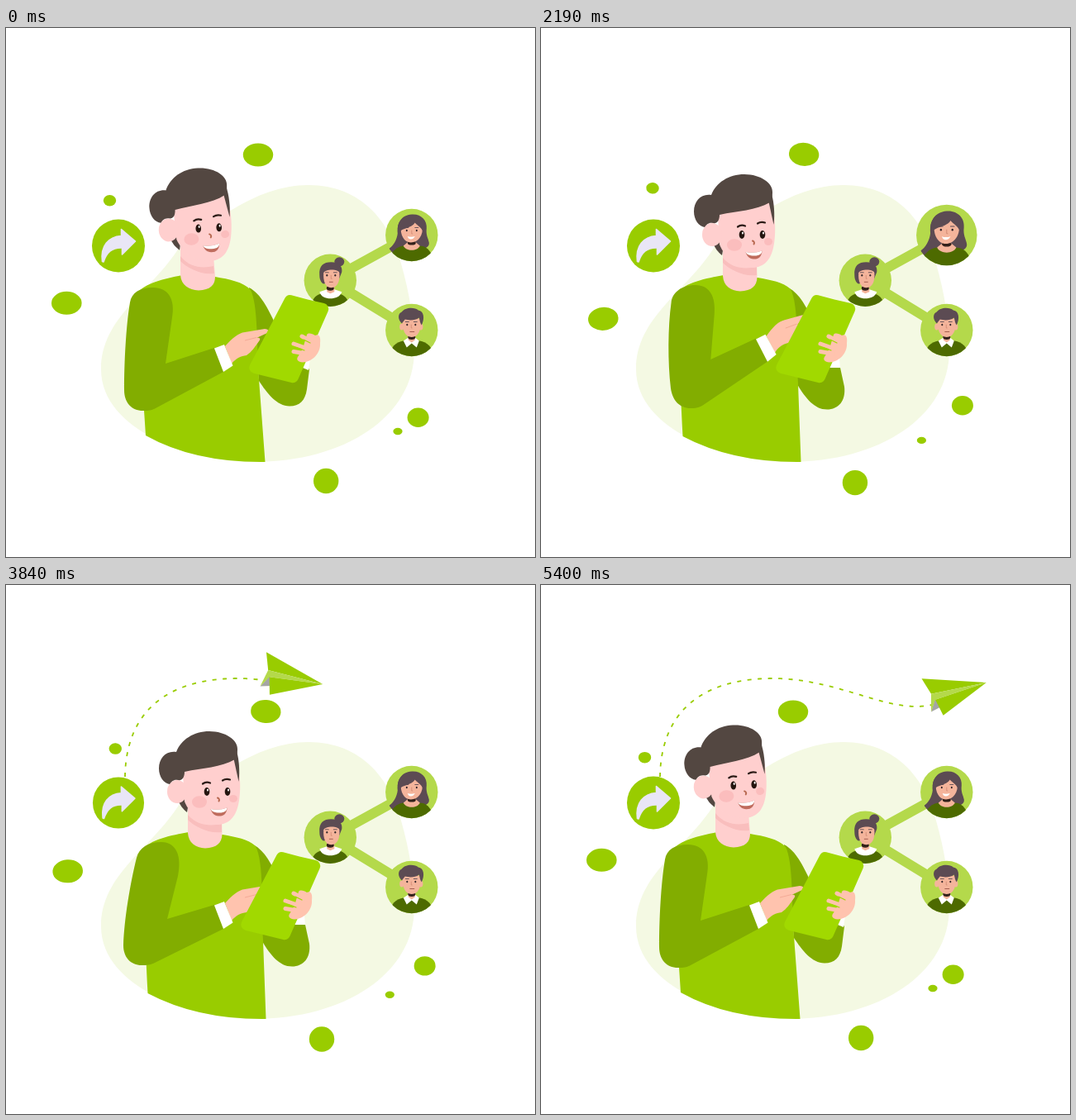
Animation, 640 px wide and 640 px high, one loop 5460 ms. Source, as an HTML page with a canvas:

```html
<!DOCTYPE html>
<html lang="en">
<head>
<meta charset="utf-8">
<title>Sharing</title>
<style>
html, body { margin: 0; width: 100%; height: 100%; overflow: hidden; background: #fff; }
canvas { display: block; width: 640px; height: 640px; }
</style>
</head>
<body>
<canvas id="stage" width="640" height="640"></canvas>
<script>
const ctx = document.getElementById('stage').getContext('2d');
const LOOP = 5460, STEP = 30;
const GREEN = '#99cc00', SLEEVE = '#82ad00', LIME = '#b4d94b', MOSS = '#4d6a00';
const HAIR = '#534741', FACE = '#ffcfce', HAND = '#ffc3ae';
const AV_HAIR = '#5c4b53', AV_SKIN = '#f4b49b';

const clamp = v => Math.max(0, Math.min(1, v));
const lerp = (a, b, k) => a + (b - a) * k;
const smooth = v => (1 - Math.cos(Math.PI * clamp(v))) / 2;

function fill(path, color) {
  ctx.fillStyle = color;
  ctx.fill(new Path2D(path));
}
function line(path, color, width) {
  ctx.strokeStyle = color;
  ctx.lineWidth = width;
  ctx.stroke(new Path2D(path));
}
function oval(x, y, rx, ry, color, turn = 0) {
  ctx.beginPath();
  ctx.ellipse(x, y, rx, ry, turn, 0, 7);
  ctx.fillStyle = color;
  ctx.fill();
}
function at(x, y, scale, turn, draw) {
  ctx.save();
  ctx.translate(x, y);
  ctx.rotate(turn);
  ctx.scale(scale, scale);
  draw();
  ctx.restore();
}
// Blend two path strings that share the same commands.
function morph(a, b, k) {
  const num = /-?\d+(\.\d+)?/g, to = b.match(num);
  let i = 0;
  return a.replace(num, v => lerp(+v, +to[i++], k).toFixed(2));
}

// ---------- timing ----------
function leanAt(t) {
  return t < 2000 ? smooth(t / 620) : 1 - smooth((t - 3990) / 750);
}
function reachAt(t) {
  if (t < 750) return smooth(t / 660);
  return Math.pow(1 - clamp((t - 750) / 3090), 1.35);
}
function pulse(t, start) {
  const u = t - start;
  if (u < 360) return lerp(1, 1.175, smooth(u / 360));
  if (u < 690) return lerp(1.175, 0.97, smooth((u - 360) / 330));
  return lerp(0.97, 1, smooth((u - 690) / 180));
}

// ---------- scenery ----------
const BLOB = 'M115 413C115 350 175 320 210 265C245 240 300 190 366 190C430 190 465 235 478 285' +
  'C488 320 494 355 494 390C494 470 410 525 300 525C232 526 115 489 115 413Z';

// x, y, rx, ry, drift x, drift y, turn
const DOTS = [
  [305, 153.5, 18.2, 14, 14.5, -0.7, 0.1],
  [73.3, 332.8, 18.3, 14, 2.2, 21, -0.1],
  [125.5, 208.7, 7.7, 6.8, 10.5, -16.5, 0.1],
  [498.6, 471.2, 13, 11.7, 12.5, -16, 0],
  [474, 488, 5.6, 4.2, -15, 12, 0],
  [387.2, 548, 15.2, 15.2, -8, 2.3, 0]
];
function dots(t) {
  const k = (1 - Math.cos(2 * Math.PI * t / LOOP)) / 2;
  for (const [x, y, rx, ry, dx, dy, turn] of DOTS)
    oval(x + dx * k, y + dy * k, rx, ry, GREEN, turn * k);
}

// ---------- avatars ----------
function eyes(x, y, gap) {
  oval(x - gap, y, 1, 1.2, '#33262a');
  oval(x + gap, y, 1, 1.2, '#33262a');
  ctx.lineCap = 'round';
  line(`M${x - gap - 2} ${y - 3.5}h4M${x + gap - 2} ${y - 3.5}h4`, AV_HAIR, 0.9);
  line(`M${x} ${y}v4h1`, '#cf8871', 0.8);
}
function bunGuy() {
  oval(11, -22.5, 6, 5.5, AV_HAIR);
  fill('M-13 -6C-14 -18 -8 -22 1 -22C11 -22 15 -17 14 -10L10 0L-7 4C-10 5 -13 0 -13 -6Z', AV_HAIR);
  fill('M-24 34C-22 20 -16 15 0 15C16 15 21 20 25 34Z', MOSS);
  fill('M-13 14L-4 11H5L14 14C12 20 6 22 0 22C-6 22 -11 20 -13 14Z', '#fff');
  fill('M-4 4H5V14L0 16L-4 14Z', AV_SKIN);
  oval(0, 9.5, 4.5, 3, '#33211b');
  fill('M-8 -9C-6 -14 10 -14 11 -9C12 0 9 9 1 9C-6 9 -9 0 -8 -9Z', AV_SKIN);
  eyes(1, -6, 5);
  line('M-1 2h4', '#a55f50', 1);
}
function longHair() {
  fill('M0 -25C11 -26 19 -18 18 -8C17 0 20 4 21 9C22 15 14 18 8 16L-12 20C-19 23 -29 22 -28 17C-22 13 -18 6 -17 -2C-18 -14 -13 -24 0 -25Z', AV_HAIR);
  fill('M-24 22C-19 15 -14 13 -8 13H9C16 13 20 16 24 23L20 38H-20Z', MOSS);
  fill('M-10 13L-4 8H4L10 13C7 20 -7 20 -10 13Z', AV_SKIN);
  oval(0, 9.5, 5, 2.6, '#33211b');
  fill('M-13 -10C-8 -18 8 -18 13 -10C14 0 8 9 -1 9C-9 9 -14 0 -13 -10Z', AV_SKIN);
  fill('M-15 -3C-12 -9 0 -8 4 -15C7 -11 12 -10 14 -3L17 -10C14 -29 -16 -29 -17 -8Z', AV_HAIR);
  eyes(0, -5.5, 6);
  fill('M-5 1.5Q-1 3 4 1.5Q2 5 -1 5Q-4 5 -5 1.5Z', '#fff');
}
function shortHair() {
  fill('M-25 25C-22 15 -12 12 0 12C12 12 21 15 25 25L20 38H-20Z', MOSS);
  fill('M-10 13L-4 9H4L9 13L6 21L0 16L-6 21Z', '#fff');
  fill('M-4 4H4V12L0 15L-4 12Z', AV_SKIN);
  oval(0, 8.5, 4.5, 3, '#33211b');
  oval(-12, -4, 2.6, 4, AV_SKIN);
  oval(11, -4, 2.6, 4, AV_SKIN);
  fill('M-11 -14H11C12 0 8 8.5 0 8.5C-8 8.5 -12 0 -11 -14Z', AV_SKIN);
  fill('M-12 -8C-17 -13 -17 -20 -12 -22C-8 -28 4 -28 8 -24C15 -23 16 -14 12 -6C10 -9 10 -11 9 -15C3 -11 -4 -12 -8 -13Z', AV_HAIR);
  eyes(-0.5, -6.5, 5);
  line('M-2 2h5', '#a55f50', 1);
}
function avatar(x, y, scale, draw) {
  at(x, y, scale, 0, () => {
    oval(0, 0, 31.7, 31.7, LIME);
    ctx.beginPath();
    ctx.arc(0, 0, 31.7, 0, 7);
    ctx.clip();
    draw();
  });
}
function network(t) {
  line('M491 250.5L392 305L491 365.5', LIME, 12);
  avatar(392.3, 305.3, pulse(t, 1260), bunGuy);
  avatar(490.8, 250.5, pulse(t, 1770), longHair);
  avatar(490.8, 365.5, pulse(t, 2280), shortHair);
}

// ---------- reader ----------
const TORSO = [
  'M213 299C190 304 168 308 158 322C160 380 166 440 169 493Q228 526 313.5 525L306 425C303 380 305 336 296 317C287 307 270 304 253 301Z',
  'M221 299C200 303 175 307 163 322C165 360 168 420 171.5 494Q232 526 314.5 525L311 430C309 385 312 336 302 316C293 307 278 305 262 302Z'
];
const FAR_ARM = [
  'M294 314C309 322 317 340 326 358L367 413L364 437C362 451 355 457.5 343 457.5C328 457.5 316 442 306 427Z',
  'M299 314C314 322 321 338 330 356L362 411L367 434C369 451 360 461.5 346 461.5C331 461.5 320 448 310 431Z'
];
const FAR_CUFF = [
  'M354 409L366 414L368 400L356 398Z',
  'M343 411L362 411L361 400L346 400Z'
];
const NECK = [
  'M211 262V299C212 311 221 317 233 317.5C247 317 253 311 253 301L251 275Z',
  'M220 265V300C221 312 229 318 241 318.5C255 318 261 312 261.5 302L261 280Z'
];
const NECK_SHADE = [
  'M211 276C222 290 238 291 251 288L252 297C235 299 219 290 211 282Z',
  'M220 278C231 291 247 292 261 289L261 299C244 301 228 292 220 284Z'
];
const ARM_REST = 'M178 314C162 314 152 320 150 332C145 362 143 405 143 438C143 453 152 464 168 463C175 463 177 462 181 460L263 416L252 387L193 406L201 350C205 328 196 314 178 314Z';
const ARM_LOW = 'M188 311C172 311 161 318 158 330C150 362 143 405 142 436C142 451 152 461 166 460C173 460 176 459 180 457L263 416L252 387L195 404L208 352C213 328 206 311 188 311Z';
const ARM_HIGH = 'M185 311C168 311 156 322 157 335C158 362 167 402 177 436C182 452 191 460 203 460C211 460 217 457 221 453L289 387L270 361L219 397L212 340C210 322 202 311 185 311Z';

function head(lean) {
  const back = 1 - lean;
  ctx.save();
  ctx.translate(235 - 11 * back, 235 - 7 * back);
  ctx.rotate(-0.05 * back);
  ctx.translate(-235, -235);
  fill('M208 260C211 267 214 271 219 275L222 258Z', HAIR);
  fill('M213 212L277 202C285 230 284 252 281 266C277 283 268 290 254 290C236 289 222 277 216 262Z', FACE);
  oval(207, 250, 12, 14, FACE);
  fill('M275 208L281.5 238C283 225 282 211 279 201Z', HAIR);
  fill('M206 202C212 187 227 177 246 177C266 177 281 188 280 199C280 205 279 209 277 211C260 221 238 221 216 226C216 233 213 237 208 236C203 235 200 238 198 241C191 240 185 232 185 222C185 209 194 200 206 202Z', HAIR);
  oval(234, 262.5, 9, 7.3, '#fbbdbd');
  oval(275, 258.5, 5, 4.6, '#fbbdbd');
  for (const x of [243, 268]) {
    oval(x, 250, 3.3, 5, '#24150f');
    oval(x + 1, 248, 1, 1.5, '#fff');
  }
  ctx.lineCap = 'round';
  line('M238 240.5Q242 237.5 247 239.5M262 236.5Q266 234 271 235.5', '#2c1c17', 2.2);
  line('M256 257.5Q259 259 257.5 261.5', '#b86a52', 2);
  fill('M247.5 271Q258 273 267.5 269.5C267 277 263 280 257 279.5C252 279 249 276 247.5 271Z', '#bf6c5d');
  fill('M247.5 271Q258 273 267.5 269.5C267 273 265 275.5 258 275.5C252 275.5 249 274 247.5 271Z', '#fff');
  ctx.restore();
}

function nearHand(reach) {
  ctx.save();
  ctx.translate(263 + 21.5 * reach, 399 - 28.5 * reach);
  ctx.rotate(-0.25 * reach);
  ctx.translate(-263, -399);
  fill('M265 385C274 375 281 369 289 368L313 364C317 364 319 367 316 369L303 375C308 374 308 377 306 379C301 386 297 392 291 396C284 397 279 399 273 406Z', HAND);
  line('M289 378L303 374.5', '#f2a893', 0.9);
  fill('M252 387.5L264 383L274.5 408.5L263 416Z', '#fff');
  ctx.restore();
}

function tablet() {
  const pts = [[330, 322], [383, 335], [341, 430.5], [281, 415.5]];
  ctx.beginPath();
  ctx.moveTo(355, 328.4);
  for (let i = 1; i <= 4; i++) {
    const a = pts[i % 4], b = pts[(i + 1) % 4];
    ctx.arcTo(a[0], a[1], b[0], b[1], 7);
  }
  ctx.closePath();
  ctx.fillStyle = '#a1d900';
  ctx.fill();
}
function gripHand() {
  fill('M354 371C356 368 361 370 364 372C369 369 371 375 370 381C371 394 360 404 349 404.5C343 404 341 401 343 398L349 388Z', HAND);
  ctx.lineCap = 'round';
  line('M348 373L362 381M338 382L355 388M338 391.5L353 394', HAND, 5);
  line('M350 377L358 381M341 386.5L351 390', '#a1d900', 1.2);
}

function reader(t) {
  const lean = leanAt(t), reach = reachAt(t);
  const pose = (pair, color) => fill(morph(pair[0], pair[1], lean), color);
  pose(FAR_ARM, SLEEVE);
  pose(FAR_CUFF, '#fff');
  pose(TORSO, GREEN);
  pose(NECK, FACE);
  pose(NECK_SHADE, '#f9bebd');
  head(lean);
  fill(morph(morph(ARM_REST, ARM_LOW, lean), ARM_HIGH, reach), SLEEVE);
  nearHand(reach);
  at(10 * (1 - lean), 0, 1, 0, () => { tablet(); gripHand(); });
}

// ---------- share button and plane ----------
const ROUTE = [
  [144, 232, 145, 155, 193, 113, 280, 113],
  [280, 113, 345, 113, 400, 142, 440, 146],
  [440, 146, 465, 149.5, 485, 143, 512, 133]
];
const track = [];
for (const [ax, ay, bx, by, cx, cy, dx, dy] of ROUTE) {
  for (let i = 0; i <= 80; i++) {
    const u = i / 80, v = 1 - u;
    const mix = (a, b, c, d) => v * v * v * a + 3 * v * v * u * b + 3 * v * u * u * c + u * u * u * d;
    const x = mix(ax, bx, cx, dx), y = mix(ay, by, cy, dy);
    const last = track[track.length - 1];
    track.push({ x, y, s: last ? last.s + Math.hypot(x - last.x, y - last.y) : 0 });
  }
}
function along(s) {
  const i = Math.max(1, track.findIndex(p => p.s >= s));
  const a = track[i - 1], b = track[i], k = (s - a.s) / (b.s - a.s || 1);
  return { x: lerp(a.x, b.x, k), y: lerp(a.y, b.y, k) };
}
const finish = track.find(p => p.x >= 472.6).s;

function plane(t) {
  const u = clamp((t - 3450) / 1950);
  if (!u) return;
  const s = finish * (1 - Math.pow(1 - u, 4));
  const end = along(s), p = along(s + 8), q = along(s + 18);
  ctx.beginPath();
  ctx.moveTo(track[0].x, track[0].y);
  for (const pt of track) if (pt.s < s) ctx.lineTo(pt.x, pt.y);
  ctx.lineTo(end.x, end.y);
  ctx.lineCap = 'butt';
  ctx.setLineDash([5, 7.5]);
  ctx.strokeStyle = GREEN;
  ctx.lineWidth = 1.8;
  ctx.stroke();
  ctx.setLineDash([]);
  at(end.x, end.y, clamp(s / 40), Math.atan2(q.y - p.y, q.x - p.x), () => {
    fill('M-3 8L6 -6L11 5Z', '#a5a5a5');
    fill('M-3 -34L71 -8L3 -13Z', GREEN);
    fill('M3 -13L71 -8L6 -5L-3 8Z', LIME);
    fill('M6 -5L71 -8L10 16Z', GREEN);
  });
}
function shareButton(t) {
  at(136, 263.5, pulse(t, 3150), 0, () => {
    oval(0, 0, 32, 32, GREEN);
    const arrow = 'M3.5 -20L20.5 -5.5L4.5 10.5V2.5C-8 2 -14 8 -18 19.5L-19.5 19C-22 0 -12 -11 3.5 -12Z';
    ctx.lineJoin = 'round';
    fill(arrow, '#e9e6f6');
    line(arrow, '#e9e6f6', 1.6);
  });
}

function draw(t) {
  ctx.fillStyle = '#fff';
  ctx.fillRect(0, 0, 640, 640);
  ctx.lineJoin = 'miter';
  ctx.lineCap = 'butt';
  fill(BLOB, '#f4f9e3');
  network(t);
  reader(t);
  dots(t);
  plane(t);
  shareButton(t);
}

const begin = performance.now();
function tick(now) {
  const t = Math.max(0, now - begin) % LOOP;
  draw(Math.min(5400, Math.floor(t / STEP) * STEP));
  requestAnimationFrame(tick);
}
draw(0);
requestAnimationFrame(tick);
</script>
</body>
</html>
```
